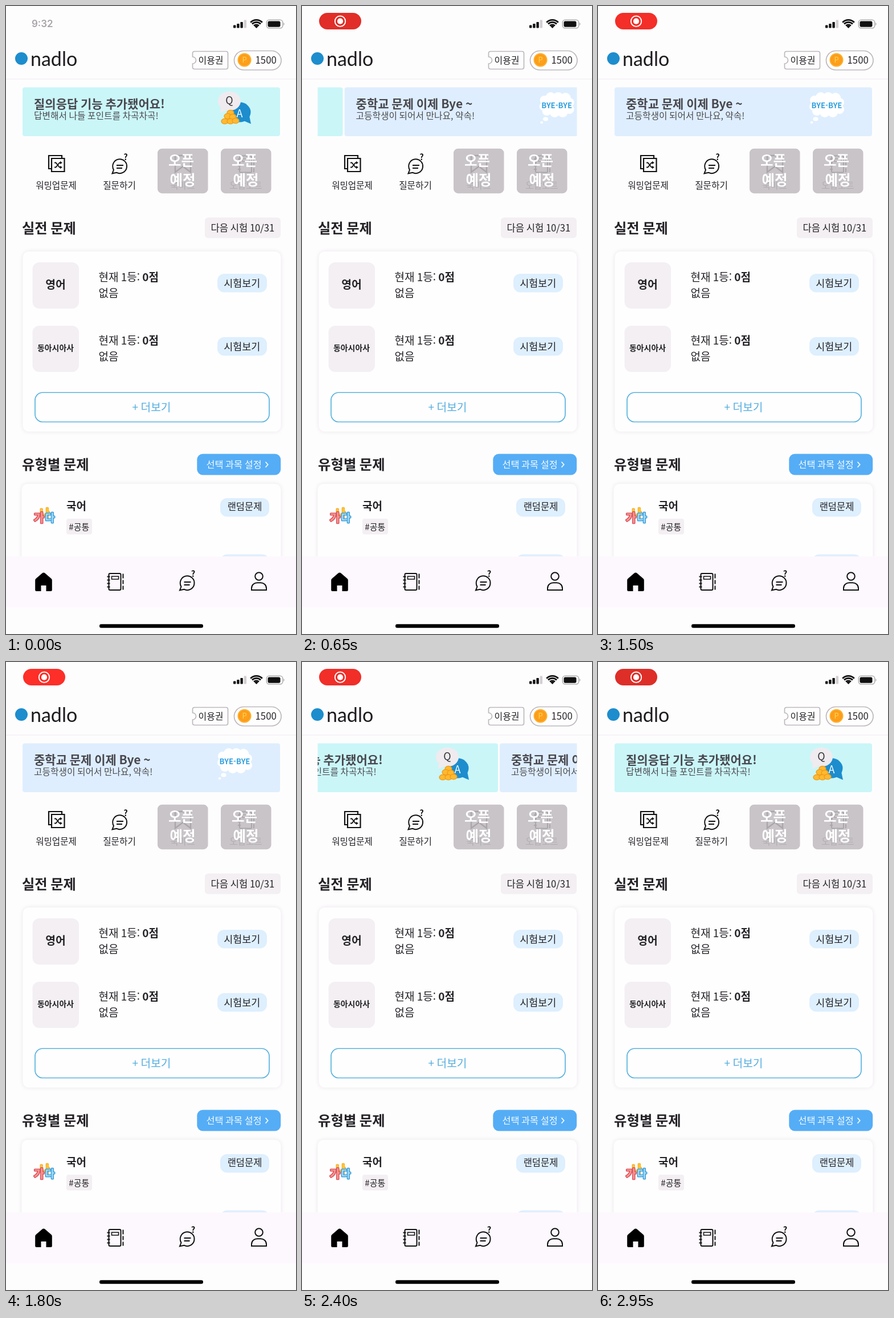
An HTML page with a canvas for the animation above (3 s loop, 509x1100 px).

```html
<!DOCTYPE html>
<html lang="ko">
<head>
<meta charset="utf-8">
<title>문제 풀이 홈</title>
<style>
html, body { margin: 0; width: 100%; height: 100%; overflow: hidden; background: #fefdfe; }
canvas { display: block; width: 509px; height: 1100px; }
</style>
</head>
<body>
<canvas id="stage"></canvas>
<script>
const W = 509, H = 1100, LOOP = 3000, STEP = 50;
const KR = '"Noto Sans CJK KR", "Noto Sans CJK JP", "Noto Sans CJK", sans-serif';
const INK = '#242226', TILE = '#f3eff3', PALE = '#deeffe', BLUE = '#1d8dcd';
const canvas = document.getElementById('stage');
const c = canvas.getContext('2d');
const dpr = window.devicePixelRatio || 1;
canvas.width = W * dpr;
canvas.height = H * dpr;

const clamp = v => Math.max(0, Math.min(1, v));
const smooth = v => { v = clamp(v); return v * v * (3 - 2 * v); };

// y is the vertical centre of the line
function text(s, x, y, size, { color = INK, weight = 400, align = 'left', font = KR } = {}) {
  c.font = `${weight} ${size}px ${font}`;
  c.fillStyle = color;
  c.textAlign = align;
  c.fillText(s, x, y + size * 0.375);
  return c.measureText(s).width;
}
const mid = (s, x, y, size, opt = {}) => text(s, x, y, size, { ...opt, align: 'center' });

function box(x, y, w, h, r, fill, stroke, lw = 1.6) {
  c.beginPath();
  c.roundRect(x, y, w, h, r);
  if (fill) { c.fillStyle = fill; c.fill(); }
  if (stroke) { c.strokeStyle = stroke; c.lineWidth = lw; c.stroke(); }
}

function oval(x, y, rx, ry, fill, stroke, lw = 1.5) {
  c.beginPath();
  c.ellipse(x, y, rx, ry, 0, 0, Math.PI * 2);
  if (fill) { c.fillStyle = fill; c.fill(); }
  if (stroke) { c.strokeStyle = stroke; c.lineWidth = lw; c.stroke(); }
}

function line(d, color = '#111', lw = 2) {
  c.strokeStyle = color;
  c.lineWidth = lw;
  c.stroke(new Path2D(d));
}

function shape(d, color) {
  c.fillStyle = color;
  c.fill(new Path2D(d));
}

function at(x, y, draw) {
  c.save();
  c.translate(x, y);
  draw();
  c.restore();
}

function card(x, y, w, h) {
  c.save();
  c.shadowColor = 'rgba(70, 50, 70, .12)';
  c.shadowBlur = 7 * dpr;
  box(x, y, w, h, 10, '#fffeff');
  c.restore();
}

function chatIcon(x, y) {
  at(x, y, () => {
    line('M-10.5 6.5L-13 12.8L-5.5 11.2A12.4 12.4 0 1 0 -10.5 6.5Z', '#111', 2);
    line('M-5.5 -1.5H6.5M-5.5 3.5H4.5', '#111', 2);
    mid('?', 10.5, -16.3, 14.5, { weight: 700, color: '#111' });
  });
}

function noteIcon(x, y, color = '#111') {
  at(x, y, () => {
    box(-11, -14.5, 21, 29, 2, null, color, 2);
    box(-6, -9.5, 12, 5, 0, null, color, 1.6);
    line('M-14 -9H-9M-14 -3H-9M-14 3H-9M-14 9H-9', color, 1.8);
    line('M14 -14V-6M14 -3V4M14 7V14', color, 2);
  });
}

function statusLeft(t) {
  c.globalAlpha = clamp(1 - t / 120);
  text('9:32', 45, 31, 17, { color: '#a9a5a9', weight: 600, font: 'Inter, sans-serif' });
  c.globalAlpha = smooth((t - 50) / 250);
  const glow = (1 - Math.cos((t - 850) / 2150 * Math.PI * 2)) / 2;
  box(30, 12, 74, 29, 14.5, `rgb(${222 + 33 * glow}, 46, 40)`);
  oval(67, 26.7, 9.2, 9.2, null, '#fff', 1.9);
  oval(67, 26.7, 5.1, 5.1, '#fff');
  c.globalAlpha = 1;
}

function statusRight() {
  [5, 7.5, 10.5, 14].forEach((h, i) =>
    box(399 + i * 6.2, 38.5 - h, 4.4, h, 1, i < 3 ? '#111' : '#d2ced2'));
  for (const r of [6.2, 10.6, 14.6]) {
    c.beginPath();
    c.arc(439.5, 39, r, -Math.PI * 0.75, -Math.PI * 0.25);
    c.strokeStyle = '#111';
    c.lineWidth = 2.8;
    c.stroke();
  }
  shape('M439.5 39L436 35.4Q439.5 32.4 443 35.4Z', '#111');
  box(457.3, 24.3, 28.5, 14.5, 4.5, null, '#a5a1a5', 1.3);
  box(459.5, 26.5, 22, 10.2, 2.6, '#111');
  shape('M487.3 29Q490 31.5 487.3 34.2Z', '#a5a1a5');
}

function header() {
  oval(27, 92, 11, 11, BLUE);
  text('nadlo', 43, 92, 34, { font: 'Lato, sans-serif', color: '#1c1a1d' });
  line('M331 79.5H386Q389.5 79.5 389.5 83V107Q389.5 110.5 386 110.5H331Q327.5 110.5 327.5 107V101A6 6 0 0 0 327.5 89V83Q327.5 79.5 331 79.5Z', '#bcb8bc', 1.7);
  mid('이용권', 359.5, 95, 16);
  box(400.5, 78.5, 82.5, 33.5, 16.7, '#fffeff', '#bcb8bc', 1.7);
  oval(418.5, 94.5, 12, 12, '#ffae25');
  oval(418.5, 94.5, 9, 9, '#fda01c', '#f7941c', 1.2);
  mid('P', 418.5, 94.5, 13, { weight: 500, color: '#ffd457' });
  text('1500', 437.5, 95, 16.8, { weight: 500 });
  box(0, 127.3, W, 1.4, 0, '#f3f0f3');
}

function coin(x, y) {
  oval(x, y, 6, 4.6, '#ffb92e', '#ef9a1b', 1.3);
}

function qaArt() {
  oval(410, 186, 19.5, 17.5, BLUE);
  shape('M417 201L430 206.5L427 192Z', BLUE);
  oval(392, 166.5, 20, 16.8, '#efebef');
  shape('M377 176L376 187L388 182Z', '#efebef');
  mid('Q', 392, 165.5, 18, { color: '#333' });
  mid('A', 410, 188, 18, { color: '#fff' });
  [[394, 187], [389, 193], [398, 194], [384, 202], [394, 202], [403, 201]].forEach(p => coin(...p));
}

function cloudArt() {
  const puffs = [[380, 165, 8], [391, 160, 9], [404, 161, 10], [417, 161, 9], [424, 169, 8],
    [378, 176, 7], [424, 181, 8], [412, 186, 9], [398, 186, 9], [384, 184, 8]];
  puffs.forEach(([x, y, r]) => oval(x, y, r, r, '#fff'));
  box(379, 161, 45, 25, 8, '#fff');
  oval(382, 198, 4.5, 3.5, '#fff');
  oval(375, 204, 2.4, 2, '#fff');
  mid('BYE-BYE', 401.5, 174, 13.2, { weight: 700, color: '#32a0df' });
}

function slide(dx, fill, title, sub, art) {
  at(dx, 0, () => {
    box(29, 142.5, 452, 85.5, 4, fill);
    text(title, 49, 171, 21, { weight: 700, color: '#48474e' });
    text(sub, 49, 192.5, 15.75, { color: '#4b4a50' });
    art();
  });
}

function banner(t) {
  const pitch = 455;
  const pos = smooth((t - 449) / 250) - smooth((t - 2241) / 250);
  c.save();
  c.beginPath();
  c.rect(27.5, 140, 455, 90);
  c.clip();
  slide(-pos * pitch, '#caf6f8', '질의응답 기능 추가됐어요!', '답변해서 나들 포인트를 차곡차곡!', qaArt);
  slide((1 - pos) * pitch, '#deeefe', '중학교 문제 이제 Bye ~', '고등학생이 되어서 만나요, 약속!', cloudArt);
  c.restore();
}

function lockedTile(x, label, icon) {
  box(x, 249.7, 88.5, 78.5, 8, '#c8c4c8');
  icon();
  mid(label, x + 44, 314, 15.6, { color: '#b1adb1' });
  const white = { weight: 700, color: '#fff' };
  mid('오픈', x + 41.5, 270.5, 24.5, white);
  mid('예정', x + 44, 305, 24.5, white);
}

function shortcuts() {
  line('M79 285H75V262H98V266', '#111', 2.2);
  box(80, 267, 22.5, 23, 0, null, '#111', 2.2);
  line('M85 274.5H87.5L94 282.5H97M85 282.5H87.5L94 274.5H97', '#111', 1.8);
  shape('M95 271.8L98.8 274.5L95 277.2ZM95 279.8L98.8 282.5L95 285.2Z', '#111');
  mid('워밍업문제', 88, 314, 15.6);
  chatIcon(199.5, 280.5);
  mid('질문하기', 199, 314, 15.7);
  lockedTile(266, '북마크', () => line('M297 262H324V291L310.5 281L297 291Z', '#aaa6aa', 2.4));
  lockedTile(377, '오답노트', () => noteIcon(421, 277, '#aaa6aa'));
}

function examRow(y, name, size) {
  box(46.5, y, 81.5, 81, 12, TILE);
  mid(name, 87, y + 39, size, { weight: 700 });
  const w = text('현재 1등: ', 162.5, y + 25.5, 19);
  text('0점', 162.5 + w, y + 25.5, 19, { weight: 700 });
  text('없음', 162.5, y + 54, 19);
  box(371, y + 20, 87, 32.5, 12, PALE);
  mid('시험보기', 414.3, y + 36.5, 17.4);
}

function exams() {
  text('실전 문제', 28, 388.5, 24.3, { weight: 700 });
  box(349, 370.5, 133, 36, 6, TILE);
  mid('다음 시험 10/31', 415.3, 388.5, 16.6);
  card(29.5, 430, 453, 315.5);
  examRow(449, '영어', 19.3);
  examRow(560, '동아시아사', 13.9);
  box(51, 677, 411, 51.5, 13.5, '#fffeff', '#58b3dc', 1.7);
  mid('+ 더보기', 255.5, 703, 19.2, { color: '#55aede' });
}

function letterArt(s, x, y, size, fill, edge) {
  c.font = `700 ${size}px ${KR}`;
  c.textAlign = 'center';
  c.lineJoin = 'round';
  c.strokeStyle = edge;
  c.lineWidth = 3;
  c.strokeText(s, x, y + size * 0.375);
  c.fillStyle = fill;
  c.fillText(s, x, y + size * 0.375);
  c.lineJoin = 'miter';
}

function topics() {
  text('유형별 문제', 28, 803, 24.4, { weight: 700 });
  box(335.3, 784.6, 146.9, 36.9, 10, '#55adf6');
  text('선택 과목 설정', 351.5, 803, 16.3, { color: '#f6faff' });
  line('M455.5 798.5L459.7 803.3L455.5 808', '#f6faff', 1.7);
  card(27.5, 837, 455, 160);
  letterArt('나', 68, 888.5, 18, '#ffc83e', '#f6b22d');
  letterArt('가', 58, 896, 20, '#f2989a', '#dc5358');
  letterArt('다', 77, 896.5, 18, '#a5dcf6', '#3b9fdb');
  text('국어', 106, 875.5, 19, { weight: 700 });
  box(106, 898, 45, 27.5, 4, TILE);
  mid('#공통', 128.3, 912, 15);
  box(376, 862, 86, 32.5, 12, PALE);
  mid('랜덤문제', 419, 877, 16.5);
  box(376, 960.5, 86, 32, 12, PALE);
}

function navBar() {
  box(0, 964, W, 89.5, 0, '#fdf8fd');
  box(0, 1053.5, W, 50, 0, '#fefdfe');
  shape('M66 992.5Q67.3 992.5 68.5 993.5L79.5 1003Q80.8 1004.2 80.8 1006V1023Q80.8 1025 78.8 1025H70.5V1015H61.5V1025H53.2Q51.2 1025 51.2 1023V1006Q51.2 1004.2 52.5 1003L63.5 993.5Q64.7 992.5 66 992.5Z', '#000');
  noteIcon(191.5, 1008.5);
  chatIcon(318, 1010.5);
  oval(444, 999, 6.8, 6.8, null, '#111', 2);
  line('M431 1023V1020C431 1013.5 436 1010.3 441 1010.3H447C452 1010.3 457 1013.5 457 1020V1023Z', '#111', 2);
  box(164, 1082.8, 182, 6.4, 3.2, '#000');
}

function draw(t) {
  c.setTransform(dpr, 0, 0, dpr, 0, 0);
  box(0, 0, W, H, 0, '#fefdfe');
  statusLeft(t);
  statusRight();
  header();
  banner(t);
  shortcuts();
  exams();
  topics();
  navBar();
}

const start = performance.now();
function tick() {
  const t = (performance.now() - start) % LOOP;
  draw(Math.floor(t / STEP) * STEP);
  requestAnimationFrame(tick);
}
tick();
</script>
</body>
</html>
```
